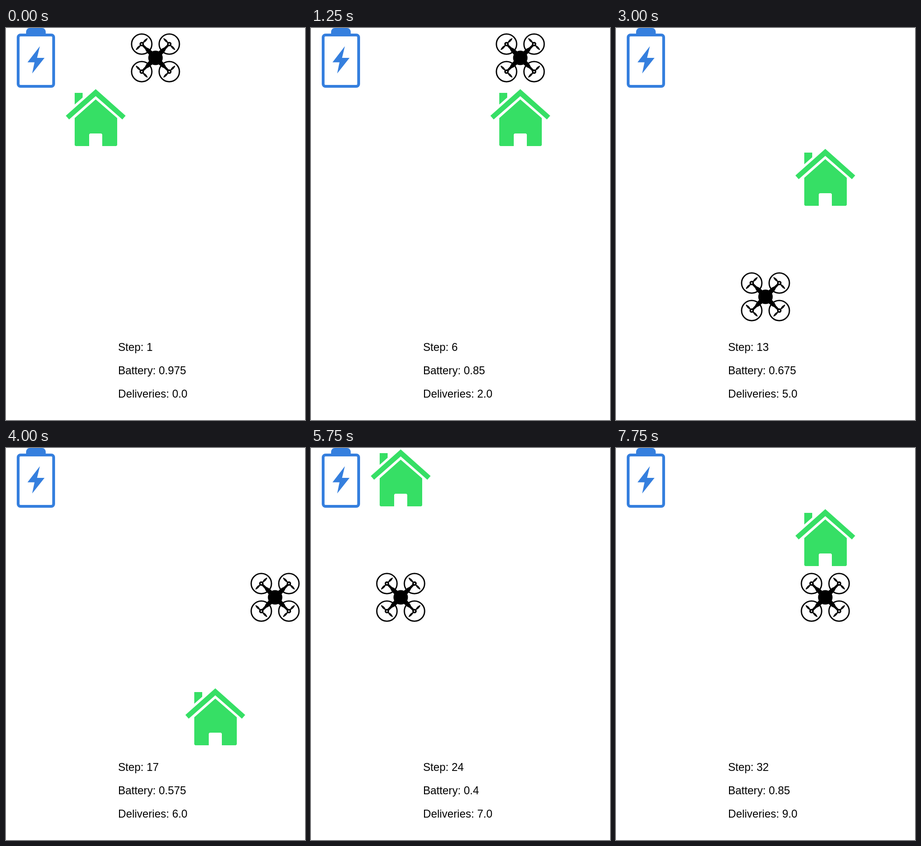
An HTML page for the animation above (8 s loop, 640 by 840 pixels).

```html
<!DOCTYPE html>
<html lang="en">
<head>
<meta charset="utf-8">
<title>Delivery drone</title>
<style>
  html, body { margin: 0; height: 100%; overflow: hidden; background: #fff; }
  svg { display: block; }
  text { font: 23.4px "Liberation Sans", Arial, sans-serif; }
</style>
</head>
<body>
<svg width="640" height="840" viewBox="0 0 640 840">
  <defs>
    <g id="arm">
      <path d="M41 -2L29 -2.6L24 -4.3L12 -5.2V5.2L24 4.3L29 2.6L41 2z"/>
      <circle cx="41.7" r="21.7" fill="none" stroke="#000" stroke-width="2.8"/>
      <path d="M41.7 -18.3Q45.5 -12 42.6 -4V4Q45.5 12 41.7 18.3Q37.9 12 40.8 4V-4Q37.9 -12 41.7 -18.3z"/>
      <circle cx="41.7" r="4.8"/>
      <circle cx="41.7" r="1.5" fill="#fff"/>
    </g>
  </defs>

  <g id="charger" fill="#357fde">
    <path d="M43 13V8Q44 0 51 0H77Q84 0 85 8V13z"/>
    <rect x="26" y="15" width="76" height="110" rx="5" fill="none" stroke="#357fde" stroke-width="6"/>
    <path d="M72.500 39L46 73.500H61L56 97.500L82.500 64H66.500z"/>
  </g>

  <g id="house" fill="#36df65">
    <path d="M64 3L128 60L121 68L64 18L7 68L0 60z"/>
    <path d="M19 11H36V21L19 36z"/>
    <path d="M64 25L110 65V123L108 125H78V100L76 98H52L50 100V125H21L19 123V65z"/>
  </g>

  <g id="drone">
    <g transform="translate(64 64)">
      <circle r="15.500"/>
      <use href="#arm" transform="rotate(45)"/>
      <use href="#arm" transform="rotate(135)"/>
      <use href="#arm" transform="rotate(225)"/>
      <use href="#arm" transform="rotate(315)"/>
    </g>
  </g>

  <text id="step" x="240" y="692"></text>
  <text id="battery" x="240" y="742"></text>
  <text id="deliveries" x="240" y="792"></text>
</svg>
<script>
const CELL = 128, STEP_MS = 250, DRAIN = 25;
// Grid cells written as column and row
const route = ("20 10 11 21 31 30 31 32 42 43 33 23 24 23 33 32 " +
               "42 43 33 34 33 23 22 12 11 01 00 10 11 12 22 32").split(" ");
const houses = "11 30 31 43 24 32 34 10 12 31".split(" ");

// Each step drains the battery, recharges at 00 and delivers on reaching the house
let charge = 1000, delivered = 0;
const states = route.map(drone => {
  if (drone === "00") charge = 1000;
  charge -= DRAIN;
  if (drone === houses[delivered]) delivered++;
  return { drone, house: houses[delivered], charge, delivered };
});

const el = id => document.getElementById(id);
const place = (id, [col, row]) =>
  el(id).setAttribute("transform", `translate(${col * CELL} ${row * CELL})`);

let shown = -1;
function draw(now) {
  const i = Math.floor(now / STEP_MS) % states.length;
  if (i !== shown) {
    const s = states[shown = i];
    place("drone", s.drone);
    place("house", s.house);
    el("step").textContent = `Step: ${i + 1}`;
    el("battery").textContent = `Battery: ${s.charge / 1000}`;
    el("deliveries").textContent = `Deliveries: ${s.delivered}.0`;
  }
}

const start = performance.now();
function tick() {
  draw(performance.now() - start);
  requestAnimationFrame(tick);
}
tick();
</script>
</body>
</html>
```
